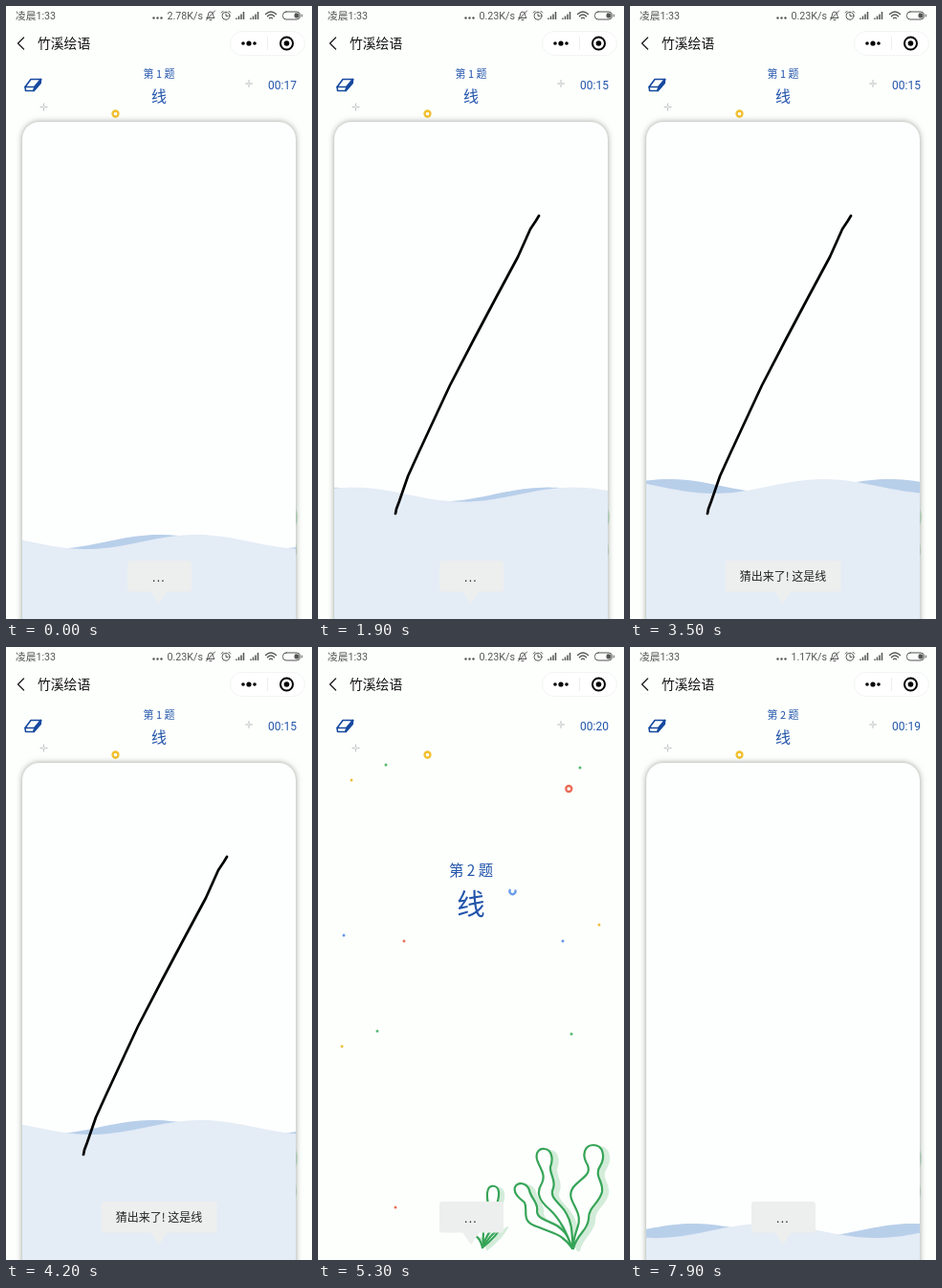
An HTML page that plays this animation: 320x640 px, repeating every 8000 ms.

```html
<!DOCTYPE html>
<html lang="zh-CN">
<head>
<meta charset="utf-8">
<title>画线</title>
<style>
html, body { margin: 0; width: 100%; height: 100%; overflow: hidden; background: #fdfffd; }
svg { display: block; width: 100vw; height: 100vh; }
text { font-family: Roboto, "Noto Sans CJK SC", "Noto Sans CJK", sans-serif; }
.cjk { font-family: "Noto Sans CJK SC", "Noto Sans CJK", sans-serif; }
.mid { text-anchor: middle; }
.end { text-anchor: end; }
.line { fill: none; stroke-linecap: round; stroke-linejoin: round; }
#card { filter: drop-shadow(0 0 3px rgba(60, 70, 60, .52)); }
</style>
</head>
<body>
<svg viewBox="0 0 320 640">
  <defs>
    <clipPath id="sheet"><rect x="17" y="121" width="286" height="560" rx="18"/></clipPath>
    <g id="kelp">
      <path d="M266 628C256 612 240 610 226 604C212 598 220 588 216 580C210 575 204 570 206 564C209 558 218 559 221 567C222 575 231 580 229 589C229 598 243 599 251 605C260 611 264 620 266 628Z"/>
      <path d="M266 628C260 612 254 598 242 587C229 576 229 568 234 560C239 550 231 543 229 535C227 526 233 523 237 524C245 525 246 535 243 543C242 550 249 556 246 565C241 576 254 580 260 592C267 604 265 616 267 628Z"/>
      <path d="M267 628C266 612 276 604 272 592C268 580 260 574 267 564C275 554 286 552 282 541C275 530 279 520 288 520C298 520 301 532 295 542C288 552 299 558 297 569C294 581 283 584 283 597C282 610 271 612 267 628Z"/>
    </g>
    <g id="sprout">
      <path d="M172 627C174 615 171 606 176 598C182 590 176 580 177 570C178 560 188 561 189 569C190 578 184 584 187 592C189 602 176 610 172 627Z"/>
      <path d="M172 627Q178 616 193 604Q186 616 172 627Q170 618 165 615"/>
    </g>
    <path id="star" d="M-4 0H-1.500L0-1.500V-4M4 0H1.500L0 1.500V4M-1.500 0L0 1.500M1.500 0L0-1.500" fill="none" stroke="#b9bcbd" stroke-width=".9"/>
  </defs>

  <g id="plants" class="line" stroke-width="2.200"></g>
  <g id="dots"></g>
  <g fill="none" stroke-width="2.300">
    <circle cx="114.500" cy="112.500" r="3" stroke="#f2bf2c"/>
    <circle cx="262.300" cy="148" r="3" stroke="#ea6a55"/>
    <path d="M201.300 253A3 3 0 1 0 206 253.500" stroke="#6a9ce8"/>
  </g>
  <use href="#star" x="39.500" y="105.500"/>
  <use href="#star" x="254" y="81"/>

  <g id="card">
    <rect x="17" y="121" width="286" height="560" rx="18" fill="#fdfffe"/>
    <g clip-path="url(#sheet)">
      <path id="back" fill="#b8cfea"/>
      <path id="front" fill="#e4ecf6"/>
    </g>
    <path id="stroke" class="line" pathLength="1" stroke="#000" stroke-width="2.700"
      d="M231 219L228 224L222 233L209 262L188 301L163 348L138 396L117 441L104 469L94 491L85 517L82 525L81 530"/>
  </g>

  <g fill="#edefee">
    <rect id="box" y="579" height="32.500" rx="3"/>
    <path d="M151 611H169L160 624Z"/>
    <text id="said" class="cjk mid" x="160" fill="#222"></text>
  </g>

  <g fill="#2355ab">
    <text id="round" class="cjk mid" y=".37em" font-size="11"></text>
    <text id="word" class="cjk mid" y=".37em" font-size="16">线</text>
    <text id="clock" class="end" x="304" y="87.300" font-size="12"></text>
  </g>
  <g class="line" stroke="#174a9f" stroke-width="1.600">
    <path d="M26 76.500H36.500L30 84.500H20Z"/>
    <path d="M20 84.500L20.500 88.500H29L36 80.500L36.500 76.500L30 84.500L29 88.500"/>
    <path d="M30 84.500L36.500 76.500L36 80.500L29 88.500Z" fill="#174a9f"/>
  </g>

  <g fill="#555" font-size="10.700">
    <text x="10" y="13.900">凌晨1:33</text>
    <text id="speed" class="end" x="206" y="13.900"></text>
    <circle cx="154.500" cy="12.500" r="1.200"/><circle cx="158.500" cy="12.500" r="1.200"/><circle cx="162.500" cy="12.500" r="1.200"/>
  </g>
  <g class="line" stroke="#555">
    <path d="M210 12.500H218Q216.500 11 216.500 8.500Q216 6 214 6Q211.500 6 211.500 9Q211.500 11 210 12.500M213 14.500H215M218.500 5L209.500 14.500"/>
    <circle cx="230" cy="10.300" r="4"/>
    <path d="M230 8V10.500H232M225.300 7L227 5.300M234.700 7L233 5.300"/>
    <path d="M241 14V12.500M243.500 14V10.500M246 14V8.500M248.500 14V6M256 14V12.500M258.500 14V10.500M261 14V8.500M263.500 14V6" stroke-width="1.500" stroke-linecap="butt"/>
    <path d="M271.500 8.500Q277 3.500 282.500 8.500M273.500 10.700Q277 7.500 280.500 10.700M275.500 12.700Q277 11.500 278.500 12.700" stroke-width="1.400"/>
    <rect x="289.500" y="6" width="18" height="8" rx="3.500"/>
    <rect x="302" y="8" width="4" height="4" rx="1" fill="#555"/>
    <path d="M309.300 9V11"/>
  </g>

  <path class="line" d="M18.500 33L12.500 39L18.500 45" stroke="#222" stroke-width="1.400"/>
  <text class="cjk" x="33" y="44.200" font-size="13.800" fill="#111">竹溪绘语</text>
  <rect x="234.500" y="26.500" width="78" height="25" rx="12.500" fill="#fff" stroke="#f2f4f3"/>
  <path d="M273.500 32V46" stroke="#eceeed"/>
  <circle cx="248" cy="39" r="1.800"/><circle cx="254" cy="39" r="2.600"/><circle cx="260" cy="39" r="1.800"/>
  <circle cx="293.500" cy="39" r="6.500" fill="none" stroke="#000" stroke-width="2"/>
  <circle cx="293.500" cy="39" r="2.800"/>
</svg>
<script>
const LOOP = 8000, STEP = 100;
const LENGTH = 230, SWELL = 7.5;
const $ = id => document.getElementById(id);
const set = (id, attrs) => {
  for (const name in attrs) $(id).setAttribute(name, attrs[name]);
};

const palette = { g: '#55b96f', y: '#efbd3a', r: '#e9705c', b: '#6698e2' };
$('dots').innerHTML = ('71,123,g 274,126,g 35,139,y 27,301,b 90,307,r 256,307,b ' +
  '294,290,y 62,401,g 265,404,g 25,417,y 81,585,r').split(' ').map(dot => {
  const [x, y, hue] = dot.split(',');
  return `<circle cx="${x}" cy="${y}" r="1.5" fill="${palette[hue]}"/>`;
}).join('');

// Each plant: a pale shadow to the right, then outlined leaves.
const plant = (id, shift) =>
  `<use href="#${id}" x="${shift}" y="2" fill="#d3ecd9" stroke="#d3ecd9"/>` +
  `<use href="#${id}" fill="#fdfffd" stroke="#36a457"/>`;
$('plants').innerHTML = plant('kelp', 6) + plant('sprout', 5);

const mix = (a, b, p) => a + (b - a) * p;
const span = (t, from, to) => Math.min(1, Math.max(0, (t - from) / (to - from)));
const ease = p => p * p * (3 - 2 * p);

function wave(crest, level) {
  let d = 'M15 700';
  for (let x = 15; x <= 305; x += 5) {
    const y = level - SWELL * Math.cos((x - crest) / LENGTH * 2 * Math.PI);
    d += `L${x} ${y.toFixed(2)}`;
  }
  return d + 'L305 700Z';
}

// Latest value whose start time has passed.
const pick = (table, t) => table.filter(row => row[0] <= t).pop()[1];
const clocks = [[0, '00:17'], [900, '00:16'], [1800, '00:15'], [4900, '00:20'], [7700, '00:19']];
const speeds = [[0, '2.78K/s'], [1400, '0.23K/s'], [5700, '1.17K/s']];
const lines = [[0, '...'], [2200, '猜出来了! 这是线'], [4400, '...']];

function render(t) {
  const sec = t / 1000;
  const hidden = t < 6000 ? ease(span(t, 4800, 5300)) : 1 - ease(span(t, 6900, 7400));
  const level = t < 6000 ? Math.max(501.5, 559.5 - 26 * sec) : 609.5 + 26 * (7.9 - sec);
  set('back', { d: wave(161 + 162.7 * sec, level) });
  set('front', { d: wave(199 - 327.5 * sec, level) });
  set('card', { transform: `translate(0 ${530 * hidden})` });

  const drawn = ease(span(t, 100, 800));
  const inked = drawn > 0 && t < 4600;
  set('stroke', { 'stroke-dasharray': `${drawn} 2`, visibility: inked ? 'visible' : 'hidden' });

  const place = (y, scale) => ({ transform: `translate(160 ${y}) scale(${scale})` });
  set('round', place(mix(71, 233, hidden), mix(1, 1.4, hidden)));
  set('word', place(mix(94, 268, hidden), mix(1, 1.84, hidden)));

  const said = pick(lines, t), short = said === '...';
  set('box', { x: short ? 127 : 100, width: short ? 67 : 120.5 });
  set('said', {
    y: short ? 600.8 : 599.6,
    'font-size': 12,
    'letter-spacing': short ? 1.4 : 0
  });
  $('said').textContent = said;
  $('round').textContent = t < 4600 ? '第 1 题' : '第 2 题';
  $('clock').textContent = pick(clocks, t);
  $('speed').textContent = pick(speeds, t);
}

const start = performance.now();
function tick() {
  const t = (performance.now() - start) % LOOP;
  render(Math.floor(t / STEP) * STEP);
  requestAnimationFrame(tick);
}
tick();
</script>
</body>
</html>
```
